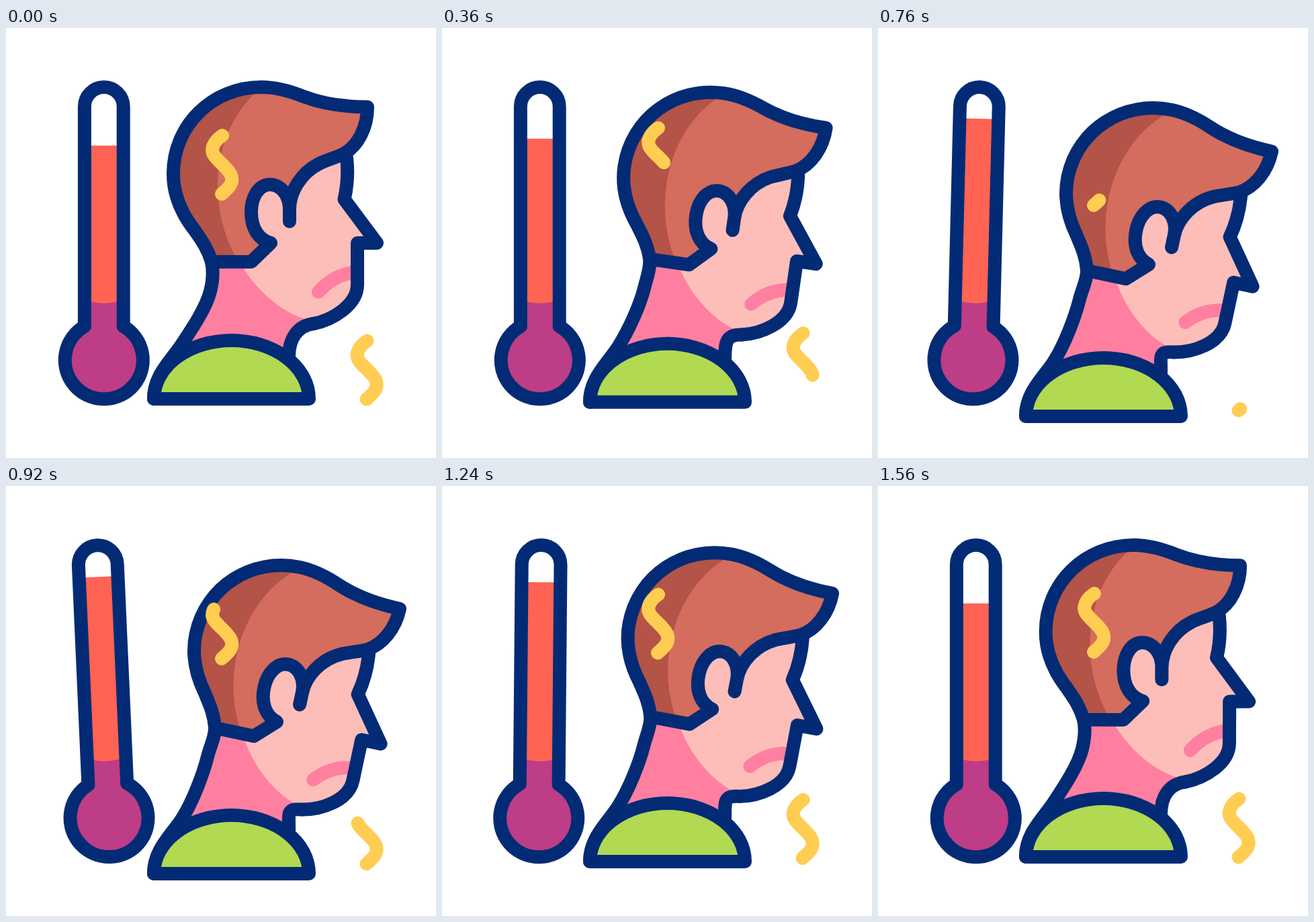
Animation of 640 by 640 pixels, one loop 1600 ms. Source, as an HTML page:

```html
<!DOCTYPE html>
<html lang="en">
<head>
<meta charset="utf-8">
<title>Fever</title>
<style>
  html, body { margin: 0; width: 100%; height: 100%; overflow: hidden; background: #fff; }
  svg { display: block; width: 100%; height: 100%; }
  .line, .wave { fill: none; stroke: #032b75; stroke-width: 20; stroke-linecap: round; stroke-linejoin: round; }
  .wave { stroke: #ffcd52; }
</style>
</head>
<body>
<svg viewBox="0 0 640 640">
  <defs>
    <path id="squiggle" pathLength="1" d="M322 160C310 168 303 180 310 190C316 199 331 209 335 219C339 230 333 237 321 247"/>
    <path id="hair" d="M306 348C299 325 288 312 280 300C262 277 249 250 249 217C249 145 307 88 380 88C402 88 423 94 443 102C472 113 504 117.500 538 117.500C538 148 524 175 503 187C488 194 476 197 466 202C440 215 422 243 422 270V288V270C422 248 408 233 393 233C376 233 365 252 365 274C365 298 376 315 394 320L365 348Z"/>
  </defs>

  <g id="thermo">
    <path id="red" fill="#ff6353"/>
    <path fill="#bd3d86" d="M117 407.500H127Q146 412 165 407.500H174.700V444A58 58 0 1 1 116.900 444Z"/>
    <path class="line" d="M116.900 444V117A28.900 29 0 0 1 174.700 117V444A58 58 0 1 1 116.900 444Z"/>
  </g>

  <path id="neck" fill="#ff7fa0"/>
  <g class="head">
    <path fill="#fdbeb9" d="M352 355C372 389 408 422 447 434L458 440C485 434 523 412 523 382V320H552L504 255C508 240 511 220 508 190L422 230L370 240V340Z"/>
    <path fill="none" stroke="#ff7fa0" stroke-width="20" stroke-linecap="round" d="M465 393C478 378 495 367 517 364"/>
    <use href="#hair" fill="#d46d5d"/>
    <path fill="#b45347" d="M306 348C299 325 288 312 280 300C262 277 249 250 249 217C249 145 307 88 380 88L372 96C335 130 315 180 315 235C315 275 325 312 346 348Z"/>
  </g>

  <path id="shirt" class="line" style="fill:#b1d952" d="M220 552A115.500 87 0 0 1 451 552Z"/>
  <path id="neckLine" class="line"/>
  <g class="head">
    <path class="line" d="M507 193C510 220 507 240 503.500 255L552 320H523V382C523 413 485 434.500 458 440"/>
    <use href="#hair" class="line"/>
  </g>

  <g id="waves">
    <use href="#squiggle" class="wave"/>
    <use href="#squiggle" class="wave" x="215.500" y="305.500"/>
  </g>
</svg>
<script>
const LOOP = 1600, STEP = 40;
const PIVOT = [370, 366];
const LAG = 28; // the second wave is trimmed a little later
const $ = id => document.getElementById(id);
const heads = document.querySelectorAll('.head');
const waves = document.querySelectorAll('.wave');

// Eased 0 to 1 between times a and b.
function ramp(t, a, b) {
  const u = Math.min(1, Math.max(0, (t - a) / (b - a)));
  return u * u * (3 - 2 * u);
}

const nod = t => 12 * (ramp(t, 80, 530) - ramp(t, 1145, 1600));
const heat = t => 40 * (ramp(t, 240, 600) - ramp(t, 1100, 1580));
const sink = t => t > 180 && t < 1460 ? 26.5 * Math.sin(Math.PI * (t - 180) / 1280) ** 2 : 0;
const sway = t => 6.1 * (ramp(t, 550, 680) - 2 * ramp(t, 680, 870)
  + 2 * ramp(t, 870, 1010) - ramp(t, 1010, 1290));
const lift = t => t < 650
  ? -20 * ramp(t, 100, 580)
  : 20 * Math.max(0, (1440 - t) / 740) ** 2;

function drawNeck(angle, dy) {
  const a = angle * Math.PI / 180, c = Math.cos(a), s = Math.sin(a);
  const at = (x, y) => x.toFixed(2) + ' ' + (y + dy).toFixed(2) + ' ';
  const turn = (x, y) => {
    const dx = x - PIVOT[0], ey = y - PIVOT[1];
    return [PIVOT[0] + dx * c - ey * s, PIVOT[1] + dx * s + ey * c];
  };
  const h = (x, y) => at(...turn(x, y));
  const [kx, ky] = turn(304, 392);
  const back = 'M' + h(306, 348) + 'C' + h(309, 362) + at(kx + 4, ky - 16) + at(kx, ky)
    + 'C' + at(kx - 6, ky + 24) + at(278, 446) + at(260, 473);
  const front = 'C' + h(434, 443) + at(421.5, 462) + at(421, 488);
  $('neckLine').setAttribute('d', back + 'C' + at(242, 499) + at(220, 518) + at(220, 552)
    + 'M' + h(458, 440) + front);
  $('neck').setAttribute('d', back + 'L' + at(340, 480) + 'L' + at(421, 488)
    + 'C' + at(421.5, 462) + h(434, 443) + h(458, 440)
    + 'L' + h(410, 380) + 'L' + h(365, 348) + 'Z');
}

function drawWave(wave, t) {
  const from = t < 650 ? 0 : 1 - ramp(t, 700, 1000);
  const to = t < 650 ? 1 - ramp(t, 210, 560) : 1;
  wave.style.strokeDasharray = `${to - from} 2`;
  wave.style.strokeDashoffset = -from;
  wave.style.visibility = to - from > 0.005 ? 'visible' : 'hidden';
}

function draw(t) {
  const angle = nod(t), dy = sink(t);
  heads.forEach(g => g.setAttribute('transform', `translate(0 ${dy}) rotate(${angle} ${PIVOT})`));
  $('shirt').setAttribute('transform', `translate(0 ${dy})`);
  drawNeck(angle, dy);

  $('thermo').setAttribute('transform', `rotate(${sway(t)} 145.8 320)`);
  $('red').setAttribute('d', `M117 ${175 - heat(t)}H174.700V415H117Z`);

  $('waves').setAttribute('transform', `translate(0 ${lift(t)})`);
  waves.forEach((wave, i) => drawWave(wave, t - i * LAG));
}

function tick() {
  draw(Math.floor(performance.now() % LOOP / STEP) * STEP);
  requestAnimationFrame(tick);
}
tick();
</script>
</body>
</html>
```
